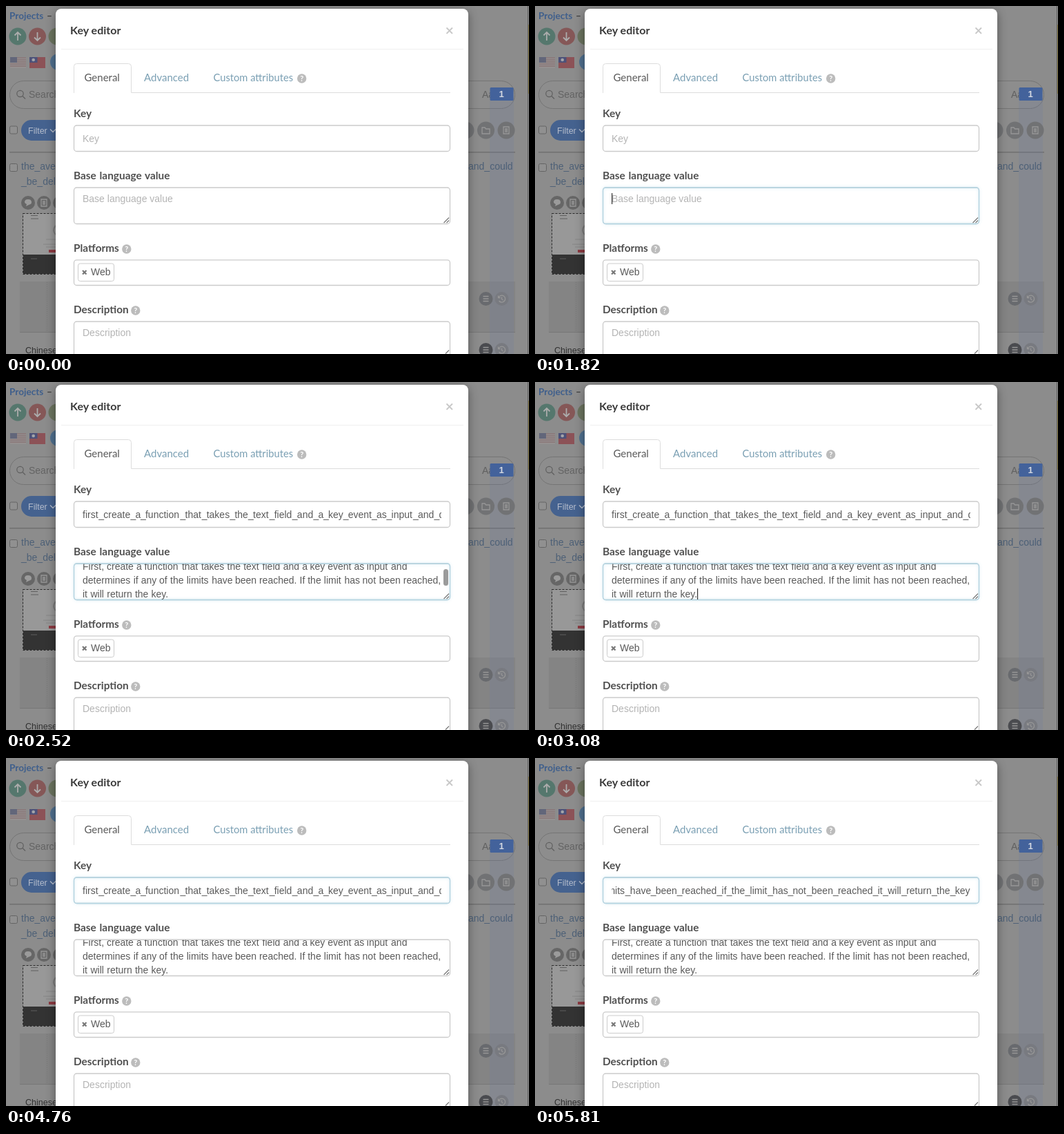
An HTML page that plays this animation: 758x504 px, repeating every 5.88 s.

```html
<!DOCTYPE html>
<html lang="en">
<head>
<meta charset="utf-8">
<title>Key editor</title>
<style>
  html, body { margin: 0; width: 100%; height: 100%; overflow: hidden; background: #8c8c8c; }
  svg { display: block; width: 758px; height: 504px; }
  text { font: 14px "Liberation Sans", Arial, sans-serif; white-space: pre; }
  .ui { font-family: Lato, "Open Sans", sans-serif; }
  .tab { font-size: 15px; fill: #7a9fb3; }
  .label { font-size: 15.4px; font-weight: 700; fill: #505050; word-spacing: 1px; }
  .hint { fill: #b4b4b4; }
  .typed { fill: #5a5a5a; }
  .field { fill: #fff; stroke: #cbcbcb; stroke-width: 1.3; }
  .glow { fill: none; stroke: #b4d6e4; stroke-width: 1.3; filter: drop-shadow(0 0 2px rgba(120,190,220,.4)); opacity: 0; }
  .caret { fill: #333; }
  .modal { fill: #fff; filter: drop-shadow(0 4px 7px rgba(0,0,0,.4)); }
  .link { fill: #4d6077; }
  .box { fill: #909090; stroke: #646464; rx: 2px; }
  .icon { fill: none; stroke: #979797; stroke-width: 1.3; }
</style>
</head>
<body>
<svg viewBox="0 0 758 504">
  <defs>
    <clipPath id="keyClip"><rect x="111" y="174" width="520" height="36"/></clipPath>
    <clipPath id="baseClip"><rect x="99" y="263.5" width="544" height="52"/></clipPath>
    <g id="help">
      <circle r="6.7" fill="#bcbcbc"/>
      <text class="ui" y="4" text-anchor="middle" style="font-size:11px;font-weight:700" fill="#fff">?</text>
    </g>
    <g id="list"><path class="icon" d="M-4-3.5H4M-4 0H4M-4 3.5H4"/></g>
    <g id="history"><path class="icon" d="M-4.5-2A5 5 0 1 1-4 3M-5-4.5V-1.5H-2M0-2.5V.5L2 2"/></g>
    <g id="page"><path class="icon" d="M-4-5H4V5H-4ZM-2-2H2M-2 0H2M-2 2H2"/></g>
  </defs>

  <!-- dimmed page -->
  <rect width="758" height="504" fill="#8c8c8c"/>
  <text class="ui" x="5" y="19" style="font-size:13.6px;font-weight:700" fill="#3f5f8c">Projects <tspan x="59" fill="#3c3c3c">–</tspan></text>
  <circle cx="17" cy="44" r="12.5" fill="#55776d"/>
  <circle cx="45.5" cy="44" r="12.5" fill="#855757"/>
  <circle cx="74" cy="44" r="12.5" fill="#6b745f"/>
  <path d="M17 50V38M12.500 42.500L17 38L21.500 42.500M45.500 38V50M41 45.500L45.500 50L50 45.500" fill="none" stroke="#acacac" stroke-width="1.8"/>
  <g id="flags">
    <rect x="6" y="74" width="23" height="16" fill="#959090"/>
    <path d="M6 75H29M6 78H29M6 81H29M6 84H29M6 87H29" stroke="#83686a" stroke-width="1.2"/>
    <rect x="6" y="74" width="10" height="8" fill="#62667a"/>
    <rect x="34" y="74" width="23" height="16" fill="#8c5257"/>
    <rect x="34" y="74" width="11.5" height="8" fill="#4c5179"/>
    <circle cx="39.700" cy="78" r="2.300" fill="#a3a3a8"/>
  </g>
  <circle cx="76" cy="81" r="12" fill="#50708f"/>

  <rect x="5.500" y="108.500" width="732" height="40" rx="20" fill="#8d8d8d" stroke="#747474"/>
  <circle cx="20.500" cy="127" r="4.700" fill="none" stroke="#5f5f5f" stroke-width="1.200"/>
  <path d="M24 130.500L28 134.500" stroke="#5f5f5f" stroke-width="1.300"/>
  <text x="33" y="133" fill="#636363">Search</text>
  <text x="690" y="133" fill="#606060">Aa</text>

  <rect class="box" x="5.500" y="174" width="11" height="11"/>
  <rect x="22" y="165" width="80" height="30" rx="15" fill="#45628f"/>
  <text x="32" y="185" style="font-size:12.500px" fill="#b4bccb">Filter</text>
  <path d="M64 178.500L68 182.500L72 178.500" fill="none" stroke="#b4bccb" stroke-width="1.400"/>
  <rect x="5" y="211" width="733" height="1.500" fill="#707070"/>

  <rect class="box" x="5.500" y="228.500" width="11" height="11"/>
  <text class="link" x="22" y="237">the_average</text>
  <text class="link" x="22" y="259">_be_delayed</text>
  <g fill="#666"><circle cx="32" cy="285" r="10"/><circle cx="55" cy="285" r="10"/><circle cx="78" cy="285" r="10"/></g>
  <path d="M27 284A5 4 0 1 1 33 288L29 290L30 287Q27 286 27 284Z" fill="#9b9b9b"/>
  <use href="#page" x="55" y="285"/>

  <rect x="24.500" y="300.500" width="80" height="88" fill="#989898"/>
  <rect x="25" y="360" width="80" height="28" fill="#333"/>
  <path d="M36 303.500H46M36 308H47M36 366H45" stroke="#5f5f5f"/>
  <path d="M58 338H72M54 345H72M58 349H72" stroke="#858585"/>
  <rect x="62" y="353" width="20" height="4" fill="#8d3a42"/>
  <path d="M72 318Q66 325 72 331" stroke="#7d7d7d" stroke-width="2" fill="none"/>
  <rect x="24.500" y="300.500" width="80" height="88" fill="none" stroke="#2a2a2a" stroke-dasharray="3 2"/>

  <rect x="20" y="399" width="718" height="73" fill="#848484"/>
  <path d="M20 472.500H738" stroke="#777"/>
  <path d="M59.500 400V472" stroke="#797979" stroke-dasharray="1 2"/>
  <text x="28" y="503" style="font-size:12.500px" fill="#303030">Chinese</text>

  <rect x="701" y="137" width="35" height="367" fill="#6a7aa0" opacity=".2"/>
  <g fill="#717274"><circle cx="666" cy="180" r="12.500"/><circle cx="695.500" cy="180" r="12.500"/><circle cx="725" cy="180" r="12.500"/></g>
  <path class="icon" d="M690 176H694L695.500 178H701V185H690Z"/>
  <use href="#page" x="725" y="180"/>
  <text class="link" x="670" y="237">and_could</text>
  <g fill="#686a6e"><circle cx="695.500" cy="424" r="10"/><circle cx="695.500" cy="498" r="10" fill="#4a4b4f"/></g>
  <g fill="#787a80"><circle cx="718.500" cy="424" r="10"/><circle cx="718.500" cy="498" r="10"/></g>
  <use href="#list" x="695.500" y="424"/><use href="#list" x="695.500" y="498"/>
  <use href="#history" x="718.500" y="424"/><use href="#history" x="718.500" y="498"/>
  <rect x="701.500" y="118" width="34" height="19" rx="1.500" fill="#43629b"/>
  <text x="718" y="132" text-anchor="middle" style="font-size:13px;font-weight:700" fill="#d4d9e2">1</text>
  <rect x="756" width="1" height="504" fill="#5c5c5c"/>
  <rect x="757" y="27" width="1" height="100" fill="#8a7d48"/>

  <!-- dialog -->
  <rect class="modal" x="72" y="4" width="598" height="540" rx="8"/>
  <text class="ui" x="93" y="41" style="font-size:16px;font-weight:700" fill="#3a3a3a">Key editor</text>
  <path d="M638.500 31.500L647 40M647 31.500L638.500 40" stroke="#c8c8c8" stroke-width="1.800"/>
  <path d="M80 62.500H663" stroke="#efefef"/>
  <path d="M98.500 126V87.500Q98.500 83.500 102.500 83.500H177.500Q181.500 83.500 181.500 87.500V125.500H644" fill="none" stroke="#ddd"/>
  <text class="ui tab" x="113.500" y="109" style="fill:#5a5a5a">General</text>
  <text class="ui tab" x="200" y="109">Advanced</text>
  <text class="ui tab" x="300.500" y="109" style="font-size:14.700px">Custom attributes</text>
  <use href="#help" x="428.700" y="105"/>

  <text class="ui label" x="98" y="161">Key</text>
  <text class="ui label" x="98" y="251">Base language value</text>
  <text class="ui label" x="98" y="356">Platforms</text>
  <use href="#help" x="174.800" y="352"/>
  <text class="ui label" x="98" y="445">Description</text>
  <use href="#help" x="187.800" y="441"/>

  <rect class="field" x="98.500" y="173" width="545" height="37.500" rx="4"/>
  <rect class="field" x="98.500" y="263" width="545" height="52.500" rx="4"/>
  <rect class="field" x="98.500" y="367.800" width="545" height="36.700" rx="4"/>
  <rect class="field" x="98.500" y="457" width="545" height="70" rx="4"/>
  <rect id="keyGlow" class="glow" x="98.500" y="173" width="545" height="37.500" rx="4"/>
  <rect id="baseGlow" class="glow" x="98.500" y="263" width="545" height="52.500" rx="4"/>

  <text id="keyHint" class="hint" x="111" y="197">Key</text>
  <g clip-path="url(#keyClip)"><text id="keyText" class="typed"></text></g>
  <text id="baseHint" class="hint" x="111" y="284">Base language value</text>
  <g id="baseText" clip-path="url(#baseClip)"></g>
  <text class="hint" x="111" y="478">Description</text>
  <rect id="thumb" x="634" y="271" width="7" height="24" rx="3.500" fill="#858585"/>
  <path d="M634.500 314L642 306.500M638.500 314L642 310.500M637 503.500L642 498.500" stroke="#777" stroke-width="1.100"/>

  <rect x="104.500" y="373" width="52" height="25.500" rx="3" fill="#fff" stroke="#ccc"/>
  <path d="M111 383L116.500 388.500M116.500 383L111 388.500" stroke="#777" stroke-width="2.200"/>
  <text class="typed" x="123" y="390">Web</text>
  <rect id="caret" class="caret" width="1.200" height="16"/>
</svg>
<script>
const $ = id => document.getElementById(id);
const LOOP = 5880, STEP = 70, NS = "http://www.w3.org/2000/svg";

// Helvetica-like advances a..z, used to set where each word begins
const ADV = [537,593,537,593,537,296,574,556,222,222,519,222,853,
             556,574,593,593,333,500,315,556,500,758,518,500,480];
const OTHER = { " ": 278, "_": 500, ".": 278, ",": 278, F: 574, I: 259 };
const advance = s => [...s].reduce(
  (w, c) => w + (OTHER[c] ?? ADV[c.charCodeAt(0) - 97]) * 0.014, 0);

function layWords(node, str, x, y) {
  node.setAttribute("y", y);
  for (const part of str.match(/[^ _]+|[ _]/g)) {
    const span = document.createElementNS(NS, "tspan");
    span.setAttribute("x", x.toFixed(2));
    span.textContent = part;
    node.append(span);
    x += advance(part);
  }
}

const lines = [
  "First, create a function that takes the text field and a key event as input and",
  "determines if any of the limits have been reached. If the limit has not been reached,",
  "it will return the key."
];
lines.forEach((line, i) => {
  const node = document.createElementNS(NS, "text");
  node.setAttribute("class", "typed");
  layWords(node, line, 111, 272 + 20 * i);
  $("baseText").append(node);
});
const slug = lines.join(" ").toLowerCase().replace(/[.,]/g, "").replace(/ /g, "_");
layWords($("keyText"), slug, 111, 197);
const overflow = advance(slug) - 519.5;

// caret places: from, to, x, y, lit time of each blink
const carets = [
  [490, 1960, 111, 271, 490],
  [1960, 4130, 235, 299, 490],
  [4130, 4970, 392.5, 184, 490],
  [4970, 5880, 629, 184, 560]
];
const BLINK = 1050;

const clamp = v => Math.min(1, Math.max(0, v));
const ease = v => { v = clamp(v); return v * v * (3 - 2 * v); };
const show = (id, on) => $(id).style.display = on ? "" : "none";

function draw(now) {
  const t = Math.floor((now % LOOP) / STEP) * STEP;

  const toBase = ease((t - 475) / 150), toKey = ease((t - 4150) / 150);
  $("baseGlow").style.opacity = toBase * (1 - toKey);
  $("keyGlow").style.opacity = toKey;

  show("baseHint", t < 1960);
  show("baseText", t >= 1960);
  show("keyHint", t < 2030);
  show("keyText", t >= 2030);
  $("keyText").setAttribute("transform", `translate(${t < 4970 ? 0 : -overflow} 0)`);
  $("thumb").style.opacity = t < 1960 ? 0 : 1 - clamp((t - 2490) / 170);

  const spot = carets.find(([from, to]) => t >= from && t < to);
  const lit = spot && (t - spot[0]) % BLINK < spot[4];
  show("caret", lit);
  if (lit) {
    $("caret").setAttribute("x", spot[2]);
    $("caret").setAttribute("y", spot[3]);
  }
}

const start = performance.now();
function tick() {
  draw(performance.now() - start);
  requestAnimationFrame(tick);
}
draw(0);
requestAnimationFrame(tick);
</script>
</body>
</html>
```
